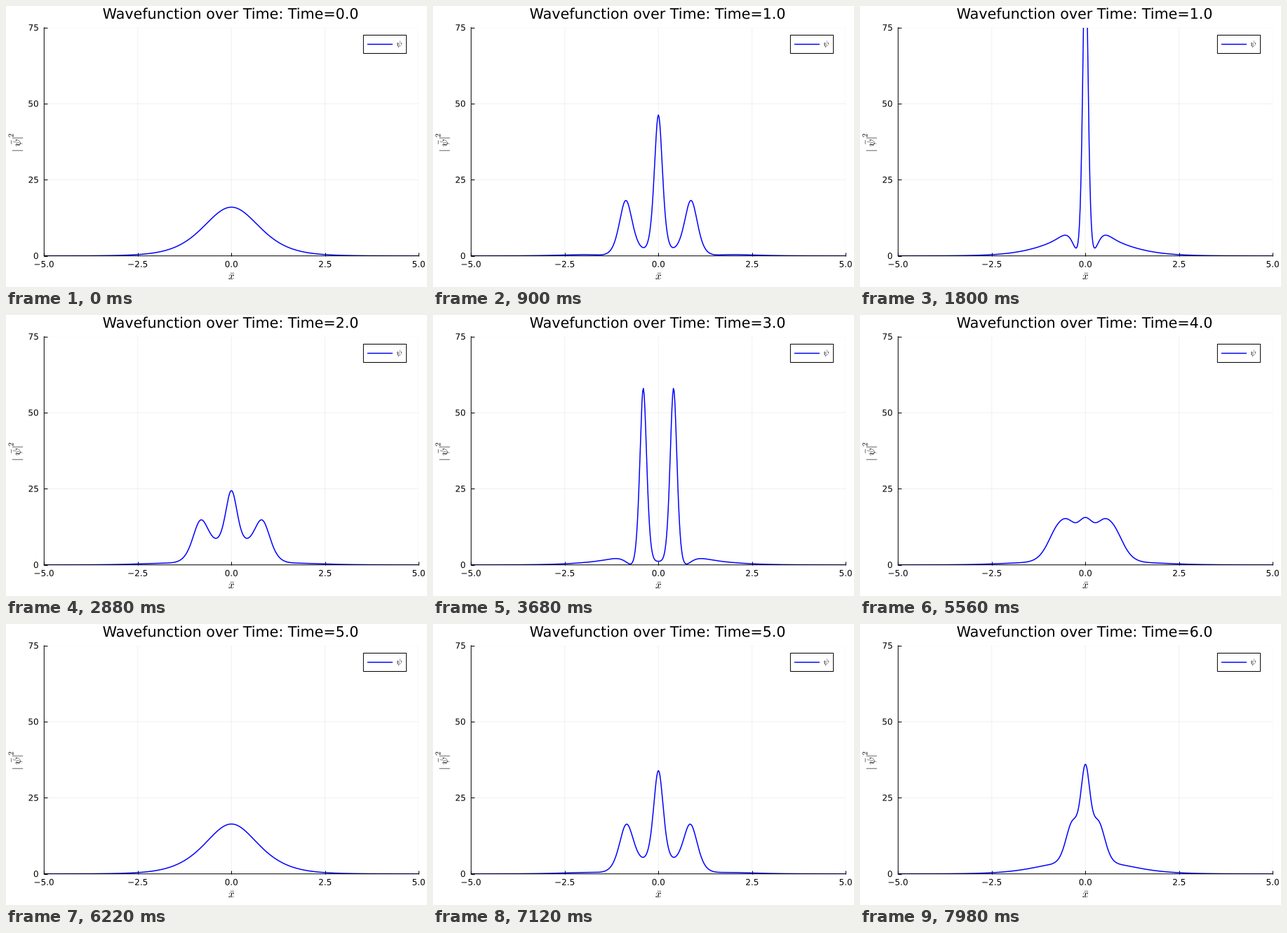
These frames come from a looping animation (600 px wide and 400 px high, 8000 ms). A matplotlib script:

```python
import numpy as np
import matplotlib.pyplot as plt
from matplotlib.animation import FuncAnimation
from matplotlib.patches import PathPatch, Rectangle
from matplotlib.textpath import TextPath
from matplotlib.transforms import Affine2D

W, H, DPI = 600, 400, 100
FRAMES, INTERVAL = 400, 20
STEP = 0.015                       # simulated time per frame
GRID = 0.0104                      # solver's spatial step
LEFT, RIGHT, TOP, BOTTOM = 54.3, 588.2, 30.7, 355.7
MID = (LEFT + RIGHT) / 2

plt.rcParams["font.family"] = "DejaVu Sans"
plt.rcParams["mathtext.fontset"] = "cm"


def pt(px):
    return px * 72 / DPI


# Four-soliton breather that starts as 4 sech(x)
AMP = np.array([1.0, 3.0, 5.0, 7.0])
SIGN = np.array([-1, 1, -1, 1])
SUMS = AMP[:, None] + AMP[None, :]
# Phase speed of each soliton, with the finite-difference correction
SPEED = AMP**2 / 2 + 7 / 72 * GRID**2 * AMP**4
half = np.linspace(0, 5, 251)
xs = np.concatenate([-half[:0:-1], half])


def density(t):
    e = SIGN * np.exp(-np.outer(half, AMP) - 1j * SPEED * t)
    ec = e.conj()
    m = (1 + e[:, :, None] * ec[:, None, :]) / SUMS
    w = np.linalg.solve(m, np.ones((len(half), 4, 1)))[..., 0]
    rho = np.abs((w * ec).sum(axis=1)) ** 2
    return np.concatenate([rho[:0:-1], rho])


fig = plt.figure(figsize=(W / DPI, H / DPI), dpi=DPI, facecolor="white")
ax = fig.add_axes([LEFT / W, 1 - BOTTOM / H,
                   (RIGHT - LEFT) / W, (BOTTOM - TOP) / H])
ax.set_xlim(-5, 5)
ax.set_ylim(0, 75)
ax.set_xticks(np.linspace(-5, 5, 5))
ax.set_yticks([0, 25, 50, 75])
ax.tick_params(direction="in", length=pt(5), width=pt(1),
               labelbottom=False, labelleft=False)
ax.grid(color="black", alpha=0.06, linewidth=pt(1))
ax.set_axisbelow(True)
for side in ("top", "right"):
    ax.spines[side].set_visible(False)
for side in ("left", "bottom"):
    ax.spines[side].set_linewidth(pt(1))
    ax.spines[side].set_snap(False)
for line in (*ax.get_xgridlines(), *ax.get_ygridlines(),
             *ax.get_xticklines(), *ax.get_yticklines()):
    line.set_snap(False)

# Overlay in pixels, y downwards
page = fig.add_axes([0, 0, 1, 1])
page.set_xlim(0, W)
page.set_ylim(H, 0)
page.axis("off")


def glyphs(x, y, s, size, align="left", turn=0):
    path = TextPath((0, 0), s, size=size)
    box = path.get_extents()
    shift = {"left": 0, "center": -(box.x0 + box.x1) / 2, "right": -box.x1}
    move = Affine2D().translate(shift[align], 0).rotate_deg(turn)
    return move.scale(1, -1).translate(x, y).transform_path(path)


def label(*args, **kw):
    patch = PathPatch(glyphs(*args, **kw), facecolor="black", linewidth=0,
                      snap=False, zorder=5)
    return page.add_patch(patch)


def heading(t):
    s = f"Wavefunction over Time: Time={round(t):.1f}"
    return glyphs(137.6, 18.2, s, 20.65)


for v in np.linspace(-5, 5, 5):
    px = LEFT + (v + 5) / 10 * (RIGHT - LEFT)
    label(px, 371.7, f"{v:.1f}".replace("-", "\u2212"), 12, align="center")
for v in (0, 25, 50, 75):
    py = BOTTOM - v / 75 * (BOTTOM - TOP)
    label(45.8, py + 4.3, str(v), 12, align="right")

label(MID, 389.2, r"$\bar{x}$", 15.3, align="center")
label(20.5, 208, r"$|\;\bar{\psi}|$", 15.3, turn=90)
label(10.5, 187, r"$2$", 10.7, turn=90)

title = page.add_patch(PathPatch(heading(0), facecolor="black", linewidth=0,
                                 snap=False))
curve, = ax.plot([], [], color="blue", linewidth=pt(1.5))

# Legend
page.add_patch(Rectangle((509.4, 41.5), 61.2, 26, facecolor="white",
                         edgecolor="black", linewidth=pt(1), snap=False))
page.plot([515, 551], [54.5, 54.5], color="blue", linewidth=pt(1.5),
          solid_capstyle="butt", snap=False)
label(560.2, 57.5, r"$\psi$", 11.75, align="center")


def update(n):
    t = STEP * n
    curve.set_data(xs, density(t))
    title.set_path(heading(t))
    return curve, title


anim = FuncAnimation(fig, update, frames=FRAMES, interval=INTERVAL,
                     repeat=True, repeat_delay=0, blit=False)
plt.show()
```
